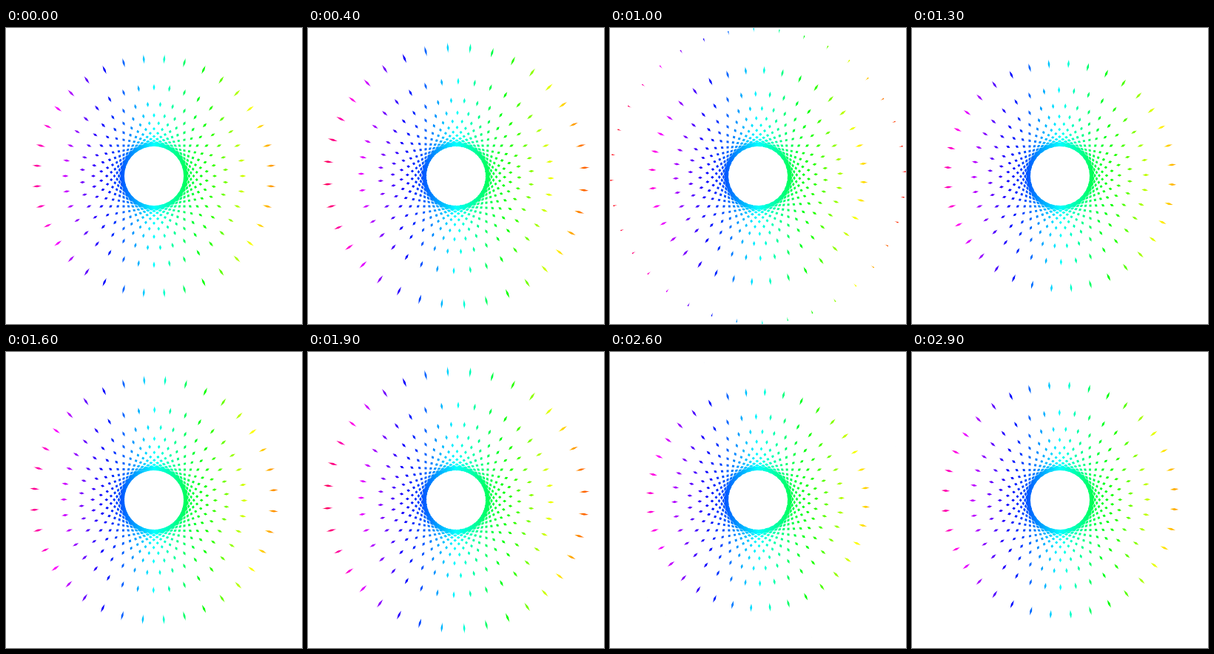
An HTML page with a canvas for the animation above (3 s loop, 400 px wide and 400 px high).

```html
<!DOCTYPE html>
<html lang="en">
<head>
<meta charset="utf-8">
<title>Crossing tangents</title>
<style>
  html, body { margin: 0; width: 100%; height: 100%; overflow: hidden; background: #fff; }
  canvas { display: block; }
</style>
</head>
<body>
<canvas id="stage" width="400" height="400"></canvas>
<script>
  const SIZE = 400;
  const CENTER = SIZE / 2;
  const RADIUS = 41;
  const RAYS = 36;
  const RAY_WIDTH = 3;
  const RAY_LENGTH = Math.sqrt(CENTER ** 2 - RADIUS ** 2);
  const LOOP = 3000;
  const STEP = 100;
  const TURN = 2 * Math.PI / RAYS;

  const ctx = document.getElementById('stage').getContext('2d');

  const rainbow = ctx.createLinearGradient(0, 0, SIZE, 0);
  ['#f00', '#f0f', '#00f', '#0ff', '#0f0', '#ff0', '#f00']
    .forEach((color, i, all) => rainbow.addColorStop(i / (all.length - 1), color));

  // Rays leave the circle along its tangents; direction is 1 (clockwise) or -1.
  function strokeRays(rotation, direction) {
    ctx.beginPath();
    for (let i = 0; i < RAYS; i++) {
      const angle = rotation + i * TURN;
      const cos = Math.cos(angle), sin = Math.sin(angle);
      const x = CENTER + RADIUS * cos;
      const y = CENTER + RADIUS * sin;
      const reach = direction * RAY_LENGTH;
      ctx.moveTo(x, y);
      ctx.lineTo(x - reach * sin, y + reach * cos);
    }
    ctx.stroke();
  }

  function draw(time) {
    const progress = Math.floor((time % LOOP) / STEP) * STEP / LOOP;
    ctx.globalCompositeOperation = 'source-over';
    ctx.clearRect(0, 0, SIZE, SIZE);
    ctx.lineWidth = RAY_WIDTH;
    ctx.strokeStyle = '#000';
    strokeRays(0, 1);
    // Keep only the overlaps of the two ray sets, then tint them.
    ctx.globalCompositeOperation = 'source-in';
    strokeRays(progress * 2 * TURN, -1);
    ctx.fillStyle = rainbow;
    ctx.fillRect(0, 0, SIZE, SIZE);
  }

  const start = performance.now();
  function tick() {
    draw(performance.now() - start);
    requestAnimationFrame(tick);
  }
  tick();
</script>
</body>
</html>
```
